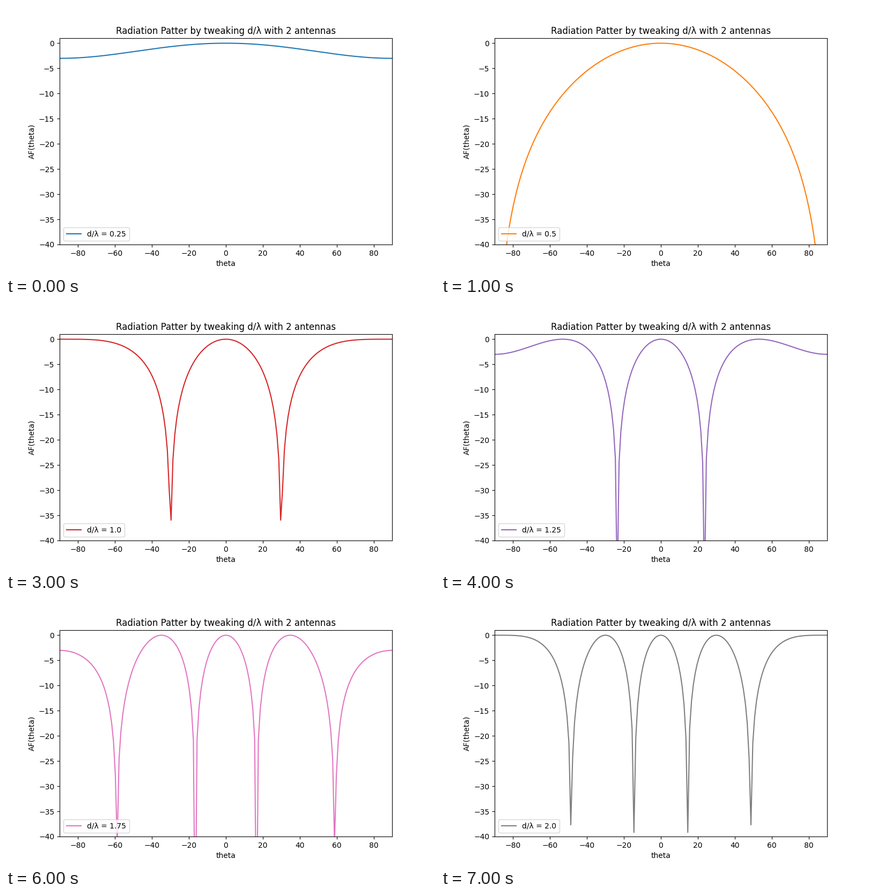
A matplotlib script for the animation above (8 s loop, 800x500 px).

```python
import matplotlib.pyplot as plt
import numpy as np
from matplotlib.animation import FuncAnimation

SPACINGS = np.arange(1, 9) * 0.25  # d/λ shown in each frame
FRAME_MS = 1000

theta = np.linspace(-np.pi / 2, np.pi / 2, 180)


def array_factor_db(spacing):
    """Normalised array factor of two antennas, in dB."""
    factor = np.abs(np.cos(np.pi * spacing * np.sin(theta)))
    return 20 * np.log10(np.maximum(factor, 1e-16))


plt.rcParams["font.family"] = "DejaVu Sans"
fig, ax = plt.subplots(figsize=(8, 5), dpi=100)
ax.set_title("Radiation Patter by tweaking d/λ with 2 antennas")
ax.set_xlabel("theta")
ax.set_ylabel("AF(theta)")
ax.set_xlim(-90, 90)
ax.set_ylim(-40, 1)
line, = ax.plot(np.degrees(theta), array_factor_db(SPACINGS[0]))


def update(i):
    spacing = SPACINGS[i]
    line.set_ydata(array_factor_db(spacing))
    line.set_color(f"C{i}")
    line.set_label(f"d/λ = {float(spacing)}")
    legend = ax.legend(loc="lower left")
    return line, legend


anim = FuncAnimation(fig, update, frames=len(SPACINGS), interval=FRAME_MS,
                     repeat=True, repeat_delay=0, blit=False)
plt.show()
```
